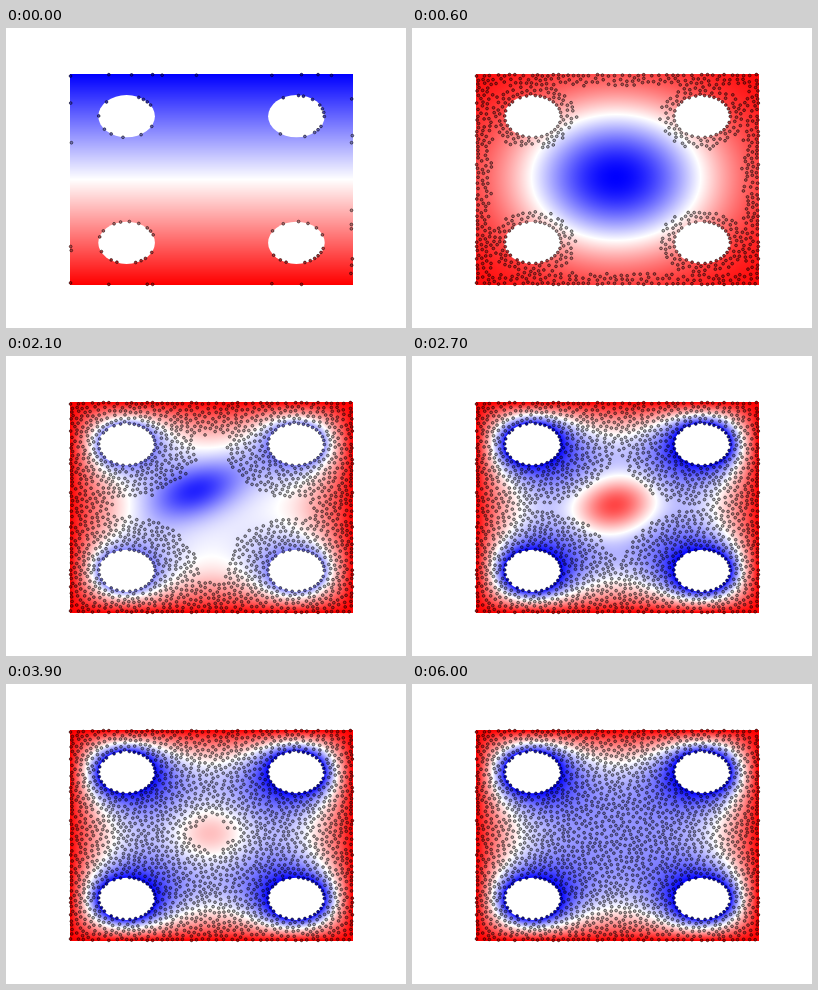
An HTML page with a canvas that plays this animation: 400x300 px, repeating every 6.1 s.

```html
<!DOCTYPE html>
<html>
<head>
<meta charset="utf-8">
<style>
html, body { margin: 0; width: 100%; height: 100%; overflow: hidden; background: #fff; }
canvas { display: block; width: 400px; height: 300px; }
</style>
</head>
<body>
<canvas id="stage" width="400" height="300"></canvas>
<script>
const ctx = document.getElementById('stage').getContext('2d');
const LEFT = 64, TOP = 46, W = 283, H = 211;
const STEP = 100, LOOP = 6100;
const HOLE_R = 0.1, SPACING = 0.017;
const HOLES = [0.2, 0.8].flatMap(y => [0.2, 0.8].map(x => [x, y]));

let seed = 7;
const random = () => (seed = (seed * 16807) % 2147483647) / 2147483647;
const lerp = (a, b, k) => a + (b - a) * k;
const clamp = (v, lo, hi) => Math.min(hi, Math.max(lo, v));
const bump = (t, centre, width) => Math.exp(-(((t - centre) / width) ** 2));
function smooth(t, from, to) {
  const k = clamp((t - from) / (to - from), 0, 1);
  return k * k * (3 - 2 * k);
}

const holeGap = (x, y) =>
  Math.min(...HOLES.map(([a, b]) => Math.hypot(x - a, y - b))) - HOLE_R;
const wallGap = (x, y) => Math.min(x, y, 1 - x, 1 - y, holeGap(x, y));

// Steady state on the unit square: 0 on the outer walls, 1 on the holes.
function solveSteadyState() {
  const w = new Float32Array(W * H), free = [];
  const kx = (W - 1) ** 2, ky = (H - 1) ** 2, decay = 1.5;
  for (let j = 1; j < H - 1; j++) {
    for (let i = 1; i < W - 1; i++) {
      const p = j * W + i;
      if (holeGap(i / (W - 1), j / (H - 1)) <= 0) w[p] = 1;
      else free.push(p);
    }
  }
  const diag = 2 * (kx + ky) + decay;
  for (let n = 0; n < 400; n++) {
    for (const p of free) {
      const next = (kx * (w[p - 1] + w[p + 1]) + ky * (w[p - W] + w[p + W])) / diag;
      w[p] += 1.95 * (next - w[p]);
    }
  }
  return w;
}

// Scattered nodes with a minimum spacing, revealed from the walls inwards.
function scatterNodes() {
  const nodes = [], cells = new Map();
  const cell = v => Math.floor(v / SPACING);
  function add(x, y) {
    const cx = cell(x), cy = cell(y);
    for (let a = cx - 1; a <= cx + 1; a++) {
      for (let b = cy - 1; b <= cy + 1; b++) {
        for (const n of cells.get(a * 1000 + b) || []) {
          if (Math.hypot(n.x - x, n.y - y) < SPACING) return;
        }
      }
    }
    const node = { x, y, key: Math.max(0, wallGap(x, y)) + random() * 0.012 };
    const id = cx * 1000 + cy;
    if (!cells.has(id)) cells.set(id, []);
    cells.get(id).push(node);
    nodes.push(node);
  }
  for (let n = 0; n < 1000; n++) {
    const s = random(), inset = random() * 0.008;
    [[s, inset], [s, 1 - inset], [inset, s], [1 - inset, s]].forEach(([x, y]) => add(x, y));
    const angle = s * 2 * Math.PI;
    HOLES.forEach(([a, b]) =>
      add(a + HOLE_R * Math.cos(angle), b + HOLE_R * Math.sin(angle)));
  }
  for (let n = 0; n < 60000; n++) {
    const x = random(), y = random();
    if (holeGap(x, y) > 0) add(x, y);
  }
  return nodes;
}

// Time in seconds; a blob in the middle sits on top of the emerging steady state.
function poseAt(t) {
  const stretch = bump(t, 2.2, 0.5);
  const radius = lerp(0.36, 0.155, smooth(t, 1.2, 2.4));
  const fading = Math.max(0, 1.15 * (5.6 - t) / 2.9);
  return {
    front: 0.006 + 0.082 * t ** 0.85,
    share: smooth(t, 1.1, 2.6),
    height: lerp(-2, fading, smooth(t, 1.7, 2.7)),
    cx: 0.495 - 0.06 * bump(t, 1.9, 0.5),
    cy: 0.49 - 0.07 * bump(t, 2.1, 0.3),
    rx: radius,
    ry: radius * (1 - 0.4 * stretch),
    tilt: -0.6
  };
}

const steady = solveSteadyState();
const nodes = scatterNodes();
const field = new Float32Array(W * H);
const image = ctx.createImageData(W, H);

function updateField(time, { share, height, cx, cy, rx, ry, tilt }) {
  const c = Math.cos(tilt), s = Math.sin(tilt);
  for (let j = 0, p = 0; j < H; j++) {
    for (let i = 0; i < W; i++, p++) {
      const dx = i / (W - 1) - cx, dy = j / (H - 1) - cy;
      const q = ((dx * c + dy * s) / rx) ** 2 + ((dy * c - dx * s) / ry) ** 2;
      const value = time < STEP
        ? 2 * j / (H - 1) - 1
        : 1 - 2 * share * steady[p] + height * Math.exp(-q);
      field[p] = clamp(value, -1, 1);
    }
  }
}

function colour(v) {
  const pale = 255 * (1 - Math.abs(v));
  return v < 0 ? [pale, pale, 255] : [255, pale, pale];
}

function drawField() {
  for (let p = 0; p < field.length; p++) {
    image.data.set([...colour(field[p]), 255], p * 4);
  }
  ctx.putImageData(image, LEFT, TOP);
  ctx.fillStyle = '#fff';
  for (const [x, y] of HOLES) {
    ctx.beginPath();
    ctx.ellipse(LEFT + x * W, TOP + y * H, HOLE_R * W, HOLE_R * H, 0, 0, 7);
    ctx.fill();
  }
}

function drawNodes(front) {
  ctx.lineWidth = 1;
  ctx.strokeStyle = 'rgba(0,0,0,0.5)';
  for (const { x, y, key } of nodes) {
    if (key > front) continue;
    const px = x * (W - 1), py = y * (H - 1);
    const value = field[Math.round(py) * W + Math.round(px)];
    ctx.fillStyle = `rgb(${colour(value).map(v => Math.round(v * 0.7))})`;
    ctx.beginPath();
    ctx.arc(LEFT + 0.5 + px, TOP + 0.5 + py, 1.4, 0, 7);
    ctx.fill();
    ctx.stroke();
  }
}

let shown = -1;
function tick() {
  const time = Math.floor(performance.now() % LOOP / STEP) * STEP;
  if (time !== shown) {
    shown = time;
    const pose = poseAt(time / 1000);
    ctx.fillStyle = '#fff';
    ctx.fillRect(0, 0, 400, 300);
    updateField(time, pose);
    drawField();
    drawNodes(pose.front);
  }
  requestAnimationFrame(tick);
}
tick();
</script>
</body>
</html>
```
